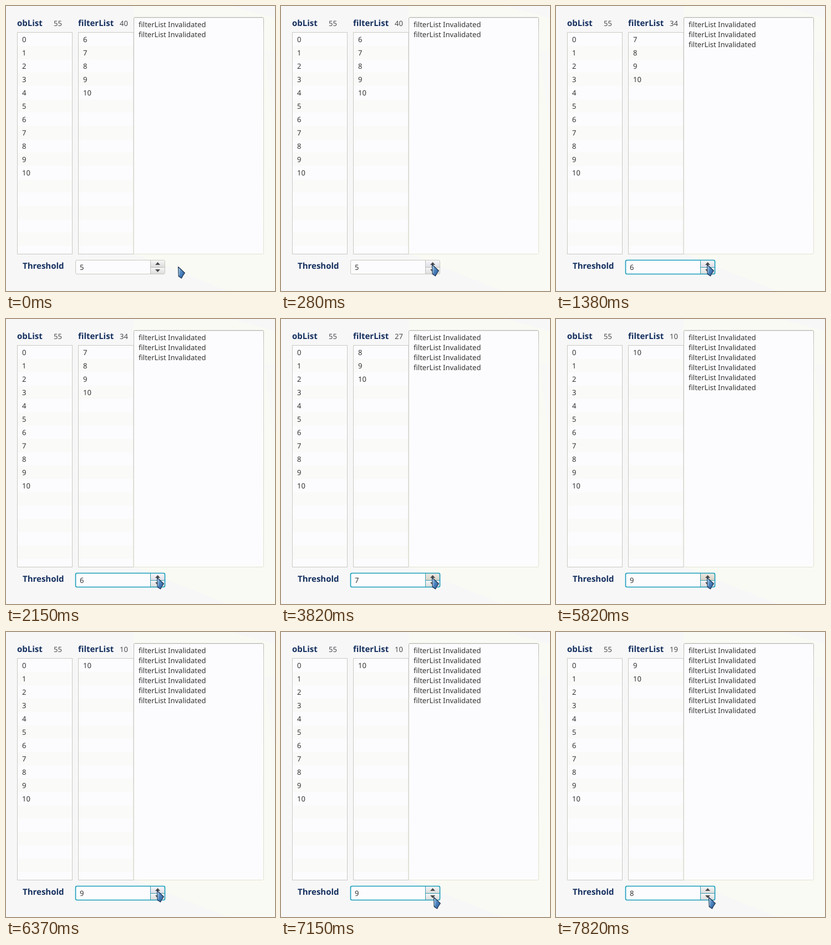
Recreate the animation shown at these times as an HTML page. Size 485x513 px, loop 8000 ms.

```html
<!DOCTYPE html>
<html lang="en">
<head>
<meta charset="utf-8">
<title>Filtered list demo</title>
<style>
  html, body { margin: 0; width: 100%; height: 100%; overflow: hidden; background: #f7f7f8; }
  svg { display: block; width: 485px; height: 513px; }
  text {
    font: 13px "Noto Sans", "Open Sans", sans-serif;
    text-rendering: geometricPrecision;
    fill: #333;
    white-space: pre;
  }
  .title { font-weight: 700; font-size: 15px; fill: #15305f; }
  .sum { fill: #4a4a4e; }
  .box { fill: none; stroke: #c9c9c3; }
</style>
</head>
<body>
<svg viewBox="0 0 485 513">
  <defs>
    <linearGradient id="area" x2="0" y2="1">
      <stop offset="0" stop-color="#b4b4ae"/>
      <stop offset=".08" stop-color="#c9c9c8"/>
      <stop offset="1" stop-color="#e2e2d2"/>
    </linearGradient>
    <linearGradient id="plain" x2="0" y2="1">
      <stop offset="0" stop-color="#f6f6f6"/>
      <stop offset="1" stop-color="#dcdcdc"/>
    </linearGradient>
    <linearGradient id="cool" x2="0" y2="1">
      <stop offset="0" stop-color="#f6f6fa"/>
      <stop offset="1" stop-color="#dedee6"/>
    </linearGradient>
    <linearGradient id="warm" x2="0" y2="1">
      <stop offset="0" stop-color="#ece9e2"/>
      <stop offset="1" stop-color="#d8d2c6"/>
    </linearGradient>
    <linearGradient id="steel" x2="1" y2="1">
      <stop offset="0" stop-color="#9cc4e4"/>
      <stop offset=".5" stop-color="#4b82bd"/>
      <stop offset="1" stop-color="#2a5590"/>
    </linearGradient>
    <pattern id="rows" y="48" width="485" height="48" patternUnits="userSpaceOnUse">
      <rect width="485" height="24" fill="#fcfcfe"/>
      <rect y="24" width="485" height="24" fill="#fafaf9"/>
    </pattern>
  </defs>

  <rect width="485" height="513" fill="#f7f7f8"/>
  <path d="M230 0H405L485 22V513H400L230 445Z" fill="#fafaf4"/>
  <path d="M465 80Q475 155 485 210V80Z" fill="#f8f8f6"/>

  <path d="M21 48H119V446H21ZM131 48H230V446H131Z" fill="url(#rows)"/>
  <rect class="box" x="20.5" y="47.5" width="99" height="399"/>
  <rect class="box" x="130.5" y="47.5" width="99.5" height="399"/>
  <rect x="230.5" y="20.5" width="234" height="426" rx="2" fill="#fcfcfe" stroke="url(#area)"/>
  <path d="M232 21.5H463" stroke="#ececea"/>

  <text class="title" x="20" y="36">obList</text>
  <text class="sum" x="86" y="36">55</text>
  <text class="title" x="130" y="36">filterList</text>
  <text class="sum" id="sum" x="205" y="36"></text>
  <text class="title" x="30" y="473">Threshold</text>
  <g id="all"></g>
  <g id="filtered"></g>
  <g id="log"></g>

  <rect x="125.5" y="457.5" width="161" height="25" rx="2.5" fill="#fcfcfe"/>
  <path id="up" d="M261 458H284Q286 458 286 460V470H261Z"/>
  <path d="M261 471H286V480Q286 482 284 482H261Z" fill="url(#plain)"/>
  <path id="lines" d="M260.5 458V482M261 470.5H286"/>
  <path d="M269 466L273.5 461L278 466ZM269 474L273.5 479L278 474Z" fill="#4a4a4a"/>
  <rect id="ring" x="125.5" y="457.5" width="161" height="25" rx="2.5" fill="none"/>
  <text id="value" x="133" y="475"></text>

  <g id="cursor">
    <path d="M.5 .5L12.3 11.5L8.8 16.5L6.5 21L1.2 17.5Z" fill="url(#steel)" stroke="#1c3250" stroke-width="1.2" stroke-linejoin="round"/>
    <path d="M1.8 3.2L2.3 15.5" stroke="#b9d7ee" stroke-width=".9"/>
  </g>
</svg>
<script>
const LOOP = 8000;
const $ = id => document.getElementById(id);

// [time, threshold, number of log lines]
const values = [[0, 5, 2], [1130, 6, 3], [3150, 7, 4], [3970, 8, 5], [5080, 9, 6], [7650, 8, 7]];
// [time, x, y]
const moves = [[0, 310, 469], [250, 290, 467], [280, 272, 465], [6650, 275, 477]];

const latest = (steps, t) => steps.filter(step => step[0] <= t).pop();
const set = (id, attrs) => Object.entries(attrs).forEach(([k, v]) => $(id).setAttribute(k, v));
const lines = (items, x, y, gap) =>
  items.map((item, i) => `<text x="${x}" y="${y + i * gap}">${item}</text>`).join("");

const numbers = Array.from({ length: 11 }, (_, i) => i);
$("all").innerHTML = lines(numbers, 29, 65, 24);
let shown = null;

function showValue(step) {
  if (step === shown) return;
  shown = step;
  const [, threshold, count] = step;
  const kept = numbers.filter(n => n > threshold);
  $("filtered").innerHTML = lines(kept, 139, 65, 24);
  $("sum").textContent = kept.reduce((a, b) => a + b, 0);
  $("log").innerHTML = lines(Array(count).fill("filterList Invalidated"), 239, 38, 18);
  $("value").textContent = threshold;
}

function render(t) {
  showValue(latest(values, t));
  const [, x, y] = latest(moves, t);
  const focused = t >= 1130;
  const overUp = t >= 280 && t < 6650;
  const phase = t % 1000;
  const isWarm = focused && (phase >= 820 || phase < 150);
  set("cursor", { transform: `translate(${x} ${y})` });
  set("up", { fill: `url(#${overUp ? (isWarm ? "warm" : "cool") : "plain"})` });
  set("ring", { stroke: focused ? "#1a9dbb" : "#c8c8be", "stroke-width": focused ? 1.6 : 1 });
  set("lines", { stroke: focused ? "#3a9fb5" : "#c0c0bb" });
}

const start = performance.now();
function tick() {
  render((performance.now() - start) % LOOP);
  requestAnimationFrame(tick);
}
tick();
</script>
</body>
</html>
```
